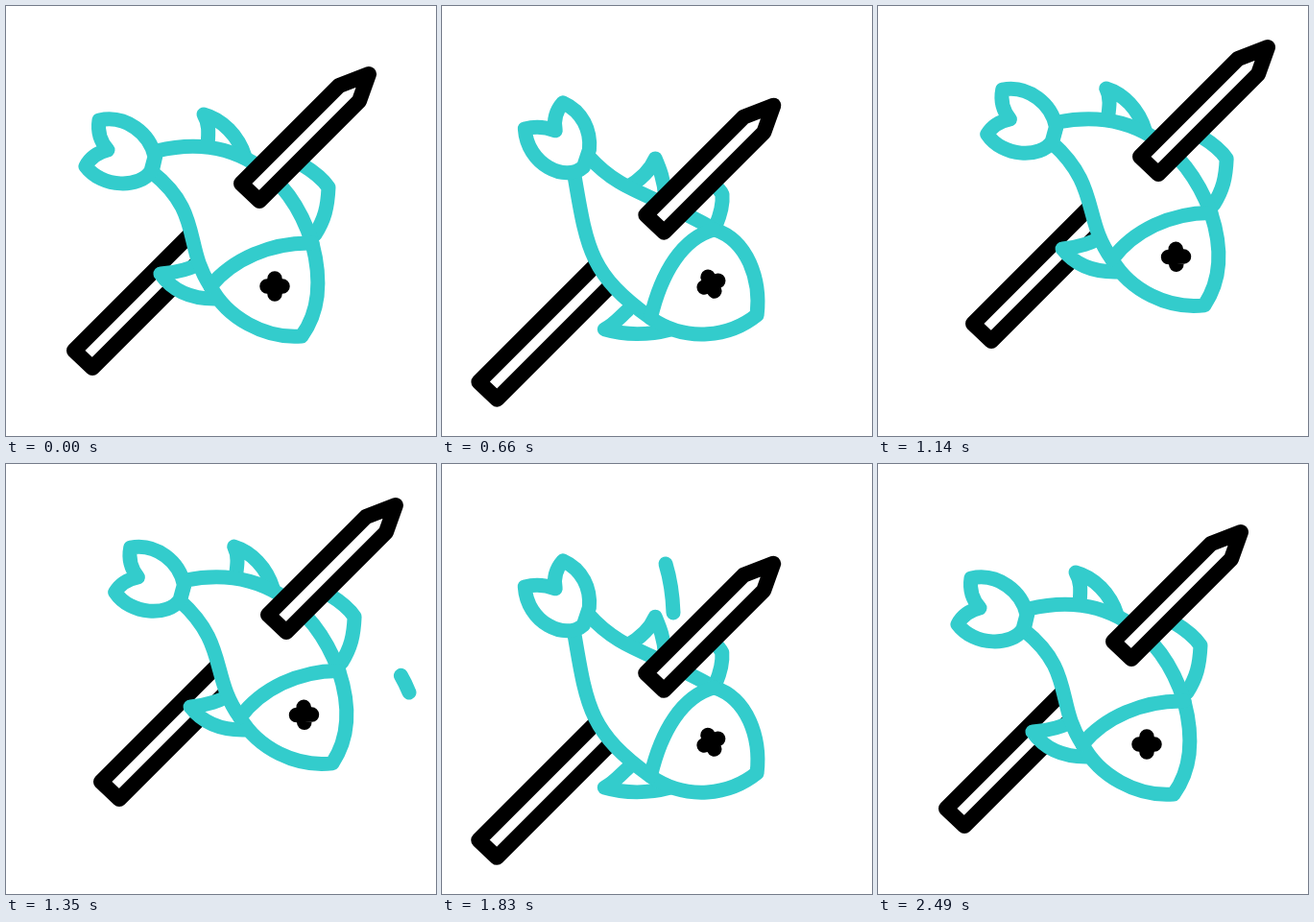
An HTML page that plays this animation: 448x448 px, repeating every 3600 ms.

```html
<!DOCTYPE html>
<html lang="en">
<head>
<meta charset="utf-8">
<title>Skewered fish</title>
<style>
  html, body { margin: 0; width: 100%; height: 100%; overflow: hidden; background: #fff; }
  svg { display: block; width: 100%; height: 100%; }
  path { fill: #fff; stroke-width: 15; stroke-linecap: round; stroke-linejoin: round; }
  .ink { stroke: #000; stroke-width: 16; }
  .sea { stroke: #3cc; }
  .line { fill: none; }
  #eye { stroke-width: 15.5; }
</style>
</head>
<body>
<svg viewBox="0 0 448 448">
  <path id="rear" class="ink" d="M215 215L71 359L90 377L234 233Z"/>
  <g id="fish"></g>
  <path id="front" class="ink" d="M245 185L264 203L368 99L378 71L347 83Z"/>
  <g id="drops"></g>
</svg>
<script>
const LOOP = 3600, STEP = 30;
const $ = id => document.getElementById(id);

// Each part: curled pose, straight pose
const PARTS = {
  dorsal: ['M210 146C211 133 212 122 206 113C225 118 242 135 249 157',
           'M192 190C203 184 216 174 222 160C226 170 231 182 232 200'],
  hind: ['M308 165C318 171 330 180 336 189C335 210 332 222 322 238',
         'M275 180C282 186 288 190 291 197C292 208 289 218 284 230'],
  belly: ['M203 267C195 273 178 278 161 279C175 299 195 305 217 305',
          'M193 318C186 324 178 334 169 338C190 344 215 344 237 338'],
  body: ['M157 151C235 132 295 172 319 247C329 285 327 318 308 344C270 347 230 325 213 292C185 250 205 215 152 173Z',
         'M153 158C185 195 215 195 283 233C318 244 332 285 328 322C300 345 255 352 217 326C153 280 150 255 137 175Z'],
  gill: ['M319 247C276 246 236 264 213 292',
         'M283 233C250 242 228 278 217 326'],
  tail: ['M155 157C150 133 125 113 97 119C95 132 99 142 106 150C94 153 87 159 83 167C100 190 140 190 151 172Z',
         'M153 150C155 130 146 110 126 101C118 110 116 120 118 130C107 126 97 125 86 128C88 165 128 185 147 168Z']
};

// Water drops: start, end, path
const DROPS = [
  [900, 1080, 'M200 212Q182 183 161 173'],
  [1170, 1380, 'M378 185Q406 203 420 238'],
  [1740, 1920, 'M233 104Q240 127 241 155'],
  [2000, 2209, 'M243 358Q247 376 252 390']
];

// Time, straightness, lift
const KEYS = [[0, 0, 0], [618, 1, 0], [1245, 0, 33], [1867, 1, 0], [2490, 0, 0], [LOOP, 0, 0]];

const mix = (a, b, k) => a + (b - a) * k;
const ease = p => p * p * (3 - 2 * p);

function addPath(parent, cls, d) {
  const el = document.createElementNS('http://www.w3.org/2000/svg', 'path');
  el.setAttribute('class', cls);
  el.setAttribute('d', d);
  return parent.appendChild(el);
}

function morph(a, b, k) {
  const to = b.match(/\d+/g);
  let i = 0;
  return a.replace(/\d+/g, n => mix(+n, +to[i++], k).toFixed(2));
}

const parts = Object.entries(PARTS).map(([name, [a, b]]) =>
  ({ a, b, el: addPath($('fish'), name === 'gill' ? 'sea line' : 'sea', a) }));
const eye = addPath($('fish'), 'ink line', 'M-8 0H8M0 -8V8');
eye.id = 'eye';

const drops = DROPS.map(([start, end, d]) => {
  const el = addPath($('drops'), 'sea line', d);
  return { start, end, el, len: el.getTotalLength() };
});

function pose(t) {
  const i = KEYS.findIndex((key, n) => t < KEYS[n + 1][0]);
  const [t0, m0, y0] = KEYS[i], [t1, m1, y1] = KEYS[i + 1];
  const k = ease((t - t0) / (t1 - t0));
  return [mix(m0, m1, k), mix(y0, y1, k)];
}

function shift(el, d) {
  el.setAttribute('transform', `translate(${d} ${-d})`);
}

function showDrop({ start, end, el, len }, t) {
  const p = (t - start) / (end - start);
  const on = p > 0 && p < 1;
  el.style.display = on ? '' : 'none';
  if (!on) return;
  const head = Math.min(1, 2 * p) * len, back = Math.max(0, 2 * p - 1) * len;
  el.style.strokeDasharray = `${head - back} ${len * 3}`;
  el.style.strokeDashoffset = -back;
}

function draw(ms) {
  const t = Math.floor((ms % LOOP) / STEP) * STEP;
  const [m, lift] = pose(t);
  for (const { a, b, el } of parts) el.setAttribute('d', morph(a, b, m));
  eye.setAttribute('transform', `translate(280 ${292 - 2 * m}) rotate(${-25 * m})`);
  shift($('fish'), lift);
  shift($('rear'), lift - 33.5 * m);
  shift($('front'), lift - 33.5 * m);
  for (const drop of drops) showDrop(drop, t);
}

const begin = performance.now();
function tick() {
  draw(performance.now() - begin);
  requestAnimationFrame(tick);
}
tick();
</script>
</body>
</html>
```
